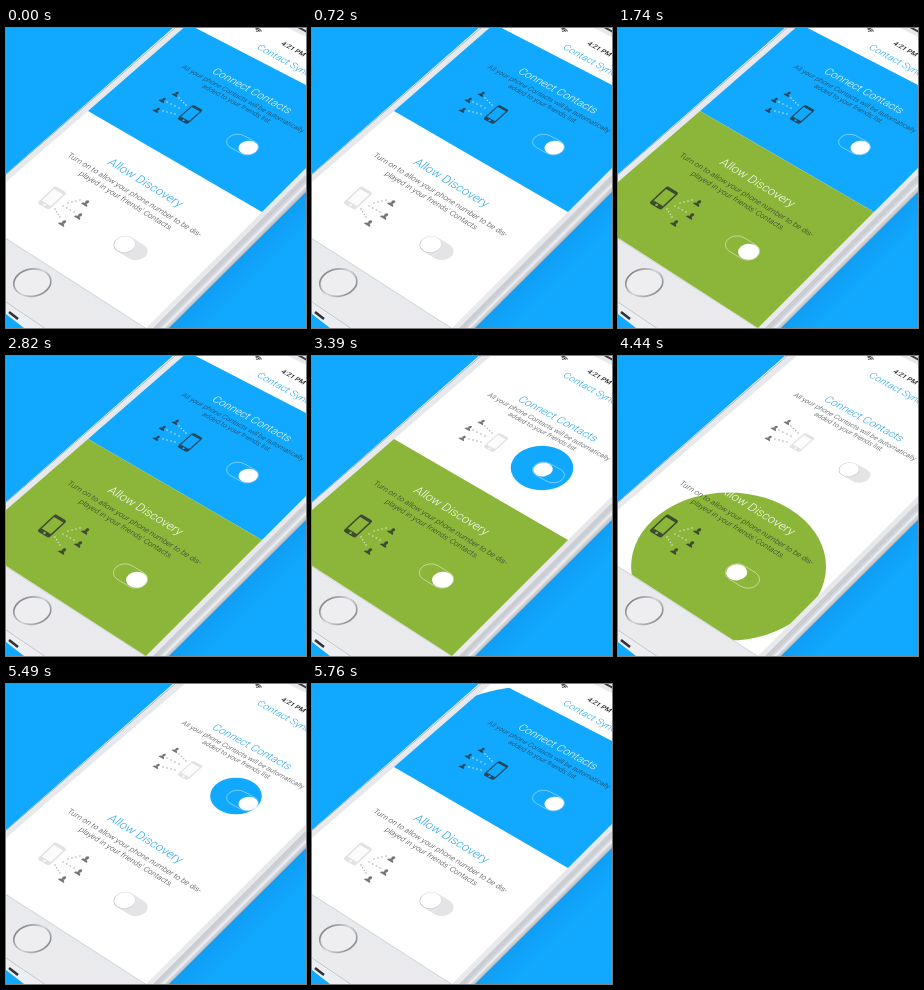
Write an HTML page with a canvas that moves like this. It is 300 by 300 pixels and loops after 5.79 s.

```html
<!DOCTYPE html>
<html lang="en">
<head>
<meta charset="utf-8">
<title>Contact Sync</title>
<style>
html, body { margin: 0; width: 100%; height: 100%; overflow: hidden; background: #11a9ff; }
canvas { display: block; width: 300px; height: 300px; }
</style>
</head>
<body>
<canvas id="stage"></canvas>
<script>
const LOOP = 5790, GROW = 540, SLIDE = 160;
const canvas = document.getElementById('stage');
const ctx = canvas.getContext('2d');
const ratio = window.devicePixelRatio || 1;
canvas.width = canvas.height = 300 * ratio;

const FACE = '"Roboto", "Liberation Sans", sans-serif';
const BLUE = [17, 169, 255];

// Each half of the screen has its own local axes on the tilted plane.
const contacts = {
  axes: [.52, .28, -.43, .385], color: BLUE, up: -424, down: 2990,
  area: [82, 83, 256, 184, 300, 140, 300, 57, 182, -4],
  center: [230, 112], drift: [0, 0], full: 190, squash: .71,
  title: ['Connect Contacts', 246, 63],
  lines: [['All your phone Contacts will be automatically', 237, 71],
          ['added to your friends list.', 231, 76]],
  toggle: [236.5, 116.5], phone: [184, 86.5], size: 1,
  people: [[170, 66], [157, 72], [151, 82]],
  dots: [[173, 70, 180, 77], [161, 74, 173, 80], [157, 83, 169, 86]]
};
const discovery = {
  axes: [.556, .34, -.47, .44], color: [139, 182, 58], up: 975, down: 4170,
  area: [82, 83, 256, 184, 140, 300, -37, 186],
  center: [121, 216.5], drift: [-21, -12], full: 196, squash: .76,
  title: ['Allow Discovery', 139.5, 155],
  lines: [['Turn on to allow your phone number to be dis-', 128.5, 167],
          ['played in your friends’ Contacts.', 120, 173]],
  toggle: [124.5, 220], phone: [46, 170], size: 1.05,
  people: [[80, 175], [73, 188], [57, 195]],
  dots: [[62, 175, 74, 172], [57, 178, 68, 184], [49, 181, 54, 189]]
};

const clamp = x => Math.max(0, Math.min(1, x));
const smooth = x => (x = clamp(x), x * x * (3 - 2 * x));
const mix = (a, b, k) => a.map((v, i) => Math.round(v + (b[i] - v) * k));
const rgb = c => `rgb(${c.join(',')})`;
const ink = alpha => `rgba(40,44,48,${alpha})`;

function trace(p) {
  ctx.beginPath();
  for (let i = 0; i < p.length; i += 2) ctx.lineTo(p[i], p[i + 1]);
  ctx.closePath();
}

function fill(p, style) {
  trace(p);
  ctx.fillStyle = style;
  ctx.fill();
}

function line(x1, y1, x2, y2, style, width) {
  ctx.beginPath();
  ctx.moveTo(x1, y1);
  ctx.lineTo(x2, y2);
  ctx.strokeStyle = style;
  ctx.lineWidth = width;
  ctx.stroke();
}

function ellipse(x, y, rx, ry, style) {
  ctx.beginPath();
  ctx.ellipse(x, y, rx, ry, 0, 0, Math.PI * 2);
  ctx.fillStyle = style;
  ctx.fill();
}

function ramp(x1, y1, x2, y2, ...colors) {
  const g = ctx.createLinearGradient(x1, y1, x2, y2);
  colors.forEach((c, i) => g.addColorStop(i / (colors.length - 1), c));
  return g;
}

function box(x, y, w, h, r) {
  ctx.beginPath();
  ctx.roundRect(x, y, w, h, r);
}

function onPlane(axes, x, y, draw) {
  ctx.save();
  ctx.transform(...axes, x, y);
  draw();
  ctx.restore();
}

function label(axes, text, x, y, font, color, align = 'center') {
  onPlane(axes, x, y, () => {
    ctx.font = font + ' ' + FACE;
    ctx.textAlign = align;
    ctx.textBaseline = 'middle';
    ctx.fillStyle = color;
    ctx.fillText(text, 0, 0);
  });
}

function drawBody() {
  ctx.fillStyle = rgb(BLUE);
  ctx.fillRect(0, 0, 300, 300);
  fill([300, 160, 300, 205, 205, 300, 160, 300],
    ramp(231, 231, 252, 252, 'rgba(0,90,180,.14)', 'rgba(0,90,180,0)'));

  // metal rim, then the glass
  fill([0, 146, 169, -2, 300, -2, 300, 164, 163, 300, 18, 300, 0, 286],
    ramp(222, 222, 232, 232, '#eceef1', '#c6cad0', '#e3e5e9', '#b4b9c1'));
  line(0, 146.5, 170, -1, '#a9b5c2', 1);
  fill([0, 149, 172, -2, 300, -2, 300, 147, 147, 300, 41, 300, 0, 273],
    ramp(200, 20, 40, 290, '#e6e8eb', '#e6e8eb', '#ebebee'));
  line(300, 147.5, 147, 301, '#bfc3ca', 1);
  line(300, 157, 156, 301, '#f0f1f4', 1.2);
  line(0, 274, 40, 301, '#c2c6cc', 1);
  line(3, 284, 12, 291, '#2c3238', 2.5);

  ctx.beginPath();
  ctx.ellipse(26.3, 254.6, 18.6, 13.6, -.15, 0, Math.PI * 2);
  ctx.fillStyle = '#eeeef0';
  ctx.fill();
  ctx.strokeStyle = ramp(12, 242, 40, 268, '#77797e', '#d4d5d9', '#7f8186');
  ctx.lineWidth = 1.7;
  ctx.stroke();

  fill([82, 83, -37, 186, 140, 300, 300, 140, 300, -2, 181, -2], '#fff');
  line(-1, 210, 140, 300.5, '#cfd0d4', .8);
}

function drawHeader() {
  const axes = [.523, .285, -.42, .37];
  fill([282, 0, 300, 9, 300, 0], '#e6e8eb');
  label(axes, 'Contact Sync', 252, 18.5, '300 17px', '#22a4ee', 'left');
  label(axes, '4:21 PM', 276, 15, '500 11.7px', '#222', 'left');
  line(292, -1, 301, 4, '#3a3d42', 2);
  onPlane(axes, 250, 4, () => {
    ctx.strokeStyle = '#333';
    ctx.lineWidth = 1.6;
    for (const r of [2, 5, 8]) {
      ctx.beginPath();
      ctx.arc(0, 0, r, -Math.PI * .75, -Math.PI * .25);
      ctx.stroke();
    }
  });
}

function drawIcons(s, on) {
  const body = rgb(mix([226, 226, 228], mix(s.color, [40, 44, 48], .78), on));
  onPlane(s.axes, ...s.phone, () => {
    ctx.scale(s.size, s.size);
    box(-10, -18.5, 20, 37, 3.5);
    ctx.fillStyle = body;
    ctx.fill();
    ctx.fillStyle = rgb(mix([252, 252, 252], s.color, on));
    ctx.fillRect(-7.8, -13.5, 15.6, 25);
    ellipse(0, 15, 1.9, 1.9, ctx.fillStyle);
  });
  const dot = rgb(mix([165, 165, 165], [225, 236, 225], on));
  for (const [x1, y1, x2, y2] of s.dots)
    for (let i = 0; i < 4; i++)
      ellipse(x1 + (x2 - x1) * i / 3, y1 + (y2 - y1) * i / 3, .75, .65, dot);
  for (const [x, y] of s.people)
    onPlane(s.axes, x, y, () => {
      ctx.scale(.84 * s.size, .84 * s.size);
      ctx.beginPath();
      ctx.ellipse(0, -2.8, 2.9, 3.6, 0, 0, Math.PI * 2);
      ctx.moveTo(-6, 5.5);
      ctx.quadraticCurveTo(-6, 1.8, -1.5, .6);
      ctx.lineTo(1.5, .6);
      ctx.quadraticCurveTo(6, 1.8, 6, 5.5);
      ctx.fillStyle = ink(.65 + .13 * on);
      ctx.fill();
    });
}

function drawToggle(s, knob, cover) {
  const off = (1 - knob) * (1 - smooth(cover * 8));
  onPlane(s.axes, ...s.toggle, () => {
    box(-26, -15.5, 52, 31, 15.5);
    ctx.fillStyle = `rgba(228,228,230,${off})`;
    ctx.fill();
    ctx.strokeStyle = `rgba(255,255,255,${.6 * (1 - off)})`;
    ctx.lineWidth = 1.1;
    ctx.stroke();
    const x = -10.5 + 21.5 * knob;
    ellipse(x, .6, 15, 15, `rgba(110,110,115,${.12 + .18 * off})`);
    ellipse(x, 0, 14.5, 14.5, '#fff');
  });
}

function drawSection(s, t) {
  const span = (lead, time) =>
    smooth((t - s.up + lead) / time) - smooth((t - s.down + lead) / time);
  const cover = span(0, GROW);
  const knob = span(SLIDE, SLIDE);

  if (cover > 0) {
    ctx.save();
    trace(s.area);
    ctx.clip();
    const shift = t > s.down ? cover : 0;
    const r = s.full * cover;
    ellipse(s.center[0] + s.drift[0] * shift, s.center[1] + s.drift[1] * shift,
      r, r * s.squash, rgb(s.color));
    ctx.restore();
  }

  const lit = smooth((cover - .19) / .1);
  label(s.axes, s.title[0], s.title[1], s.title[2], '300 18.8px',
    rgb(mix([34, 164, 238], [255, 255, 255], lit)));
  for (const [text, x, y] of s.lines)
    label(s.axes, text, x, y, '300 11.9px', ink(.92));
  drawIcons(s, smooth((cover - .4) / .1));
  drawToggle(s, knob, cover);
}

function frame(now) {
  const t = now % LOOP;
  ctx.setTransform(ratio, 0, 0, ratio, 0, 0);
  drawBody();
  drawSection(contacts, t > 4500 ? t - LOOP : t);
  drawSection(discovery, t);
  drawHeader();
}

const start = performance.now();
function tick() {
  frame(performance.now() - start);
  requestAnimationFrame(tick);
}
tick();
</script>
</body>
</html>
```
